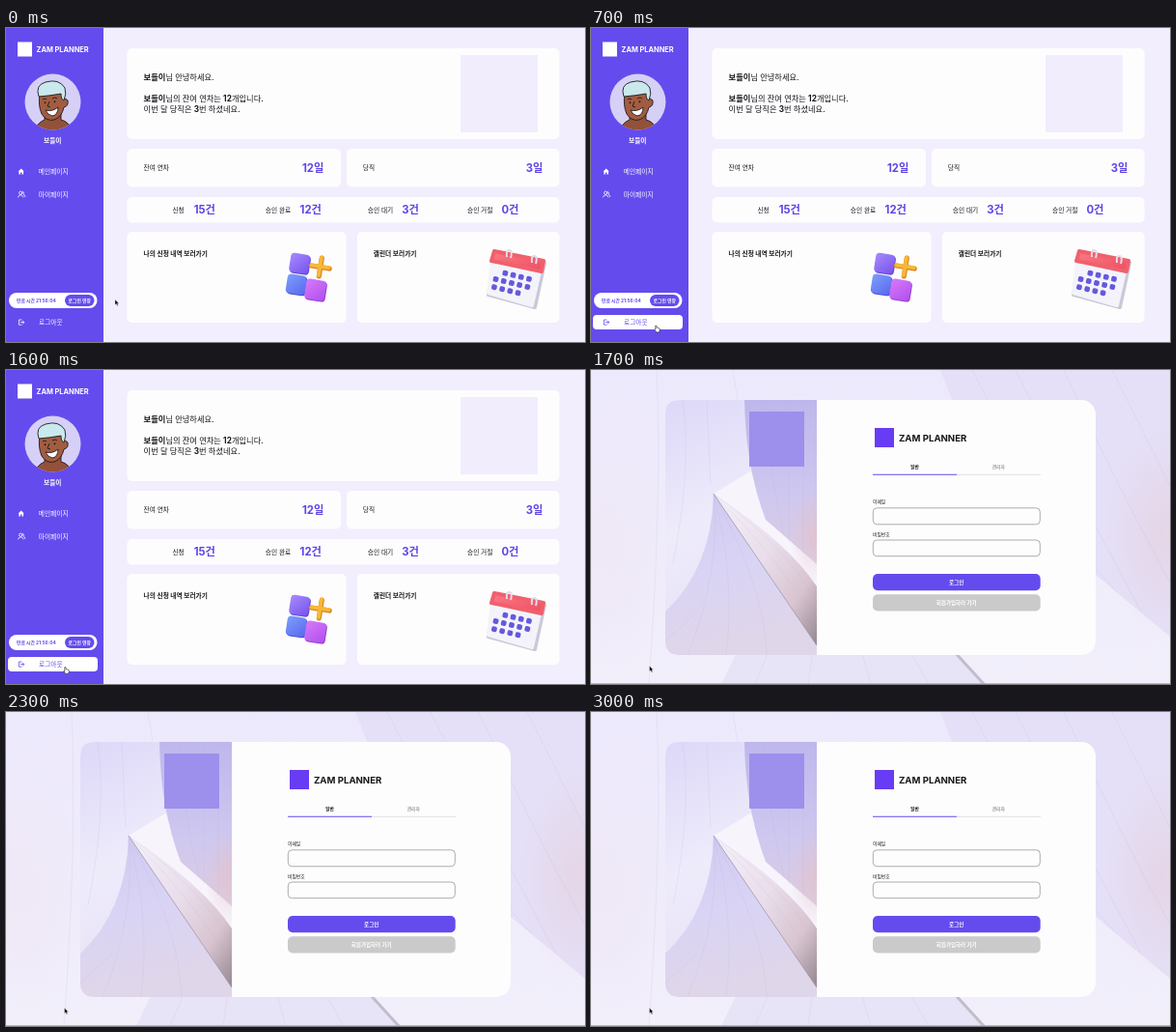
Write an HTML page that moves like this. It is 600 by 325 pixels and loops after 3.1 s.

```html
<!DOCTYPE html>
<html lang="ko">
<head>
<meta charset="utf-8">
<title>Planner sign-out</title>
<style>
  html, body { margin: 0; width: 100%; height: 100%; overflow: hidden; }
  svg { display: block; width: 600px; height: 325px; }
  text { font: 500 6.7px Inter, "Noto Sans CJK KR", sans-serif; fill: #17171b; }
  .bold, tspan { font-weight: 700; }
  .mid { text-anchor: middle; }
  .white { fill: #fff; }
  .brand { fill: #644bee; }
  .hello text { font-size: 8.25px; }
  .count text { font-size: 11.3px; font-weight: 700; fill: #5f45e6; text-anchor: end; }
  .tiny text { font-size: 4.8px; }
  .cards rect { fill: #fdfdfe; rx: 5px; }
  .icon { fill: none; stroke: #fff; stroke-width: .8; stroke-linejoin: round; stroke-linecap: round; }
  .field { fill: #fdfdfe; stroke: #98989e; stroke-width: .8; }
  .thin { fill: none; stroke: #b3aad8; stroke-width: .4; opacity: .45; }
</style>
</head>
<body>
<svg viewBox="0 0 600 325">
  <defs>
    <linearGradient id="violet" x2="1" y2="1"><stop stop-color="#a78bfb"/><stop offset="1" stop-color="#7654ee"/></linearGradient>
    <linearGradient id="blue" x2="1" y2="1"><stop stop-color="#7da0fc"/><stop offset="1" stop-color="#5a68ee"/></linearGradient>
    <linearGradient id="pink" x2="1" y2="1"><stop stop-color="#d77afa"/><stop offset="1" stop-color="#b14fee"/></linearGradient>
    <linearGradient id="red" x2="1" y2="1"><stop stop-color="#fb7c85"/><stop offset="1" stop-color="#ee4d60"/></linearGradient>
    <linearGradient id="haze" x2="0" y2="1"><stop stop-color="#ede9fc"/><stop offset="1" stop-color="#f2effb"/></linearGradient>
    <linearGradient id="wall" y2="1" x2=".3"><stop stop-color="#dcd8f8"/><stop offset=".5" stop-color="#eeebfb"/><stop offset="1" stop-color="#e6e1f6"/></linearGradient>
    <linearGradient id="shade" y2="1" x2="0"><stop stop-color="#beb7ec"/><stop offset=".6" stop-color="#cfc8ef"/><stop offset="1" stop-color="#dccde0"/></linearGradient>
    <linearGradient id="sail" y2="1" x2=".2"><stop stop-color="#cfc9f0"/><stop offset=".5" stop-color="#d9d4f5"/><stop offset="1" stop-color="#e0d6e9"/></linearGradient>
    <linearGradient id="fan" x2="1" y2="1"><stop stop-color="#f5f1fa"/><stop offset=".45" stop-color="#e9deeb"/><stop offset=".75" stop-color="#d8c4d0"/><stop offset="1" stop-color="#94868f"/></linearGradient>
    <radialGradient id="blush"><stop stop-color="#e5bfc6" stop-opacity=".6"/><stop offset="1" stop-color="#e5bfc6" stop-opacity="0"/></radialGradient>
    <clipPath id="panel"><path d="M234 31H92Q77 31 77 46V280Q77 295 92 295H234Z"/></clipPath>
    <clipPath id="portrait"><circle cx="48.5" cy="76.5" r="29"/></clipPath>
  </defs>

  <g id="dashboard">
    <rect width="600" height="325" fill="#f2eefd"/>
    <rect width="101" height="325" class="brand"/>
    <rect x="12" y="14.5" width="15" height="15" fill="#fff"/>
    <text x="31.5" y="24.6" class="bold white" style="font-size:7.4px">ZAM PLANNER</text>

    <circle cx="48.5" cy="76.5" r="29" fill="#d6d0f6"/>
    <g clip-path="url(#portrait)" stroke="#1d1a20" stroke-width=".9" stroke-linejoin="round">
      <path d="M29 108Q32 98 40 95V87H57V95Q66 97 69 108Z" fill="#93513a"/>
      <path d="M35 68Q33 80 37 89Q42 97 50 95Q58 92 60 82Q65 81 64 75Q62 72 59 74L58 65Z" fill="#a25c40"/>
      <path d="M34 71Q30 59 41 56Q55 52 61 62Q63 68 60 75Q57 74 57 68Q46 70 34 71Z" fill="#c9e9ec"/>
      <path d="M41 85Q48 87 54 82Q54 90 48 91Q43 90 41 85Z" fill="#fff"/>
      <path d="M38 74Q40 72 42 74M48 73Q51 71 53 73M45 76L43 81L46 82" fill="none"/>
      <path d="M40.5 77V77.6M50.5 76V76.6" stroke-width="1.6" stroke-linecap="round"/>
    </g>
    <text x="48.3" y="118.7" class="bold white mid">보들이</text>

    <path d="M12.6 148.5L15.7 145.4L18.8 148.5H18V151.5H16.5V149.4H14.9V151.5H13.4V148.5Z" fill="#fff"/>
    <g class="icon">
      <circle cx="15.2" cy="170.7" r="1.6"/>
      <path d="M12.6 175Q13 172.8 15.2 172.8T18 175M17.5 169.2Q19.2 170 18 172Q19.5 172.6 19.8 174.5"/>
    </g>
    <text x="33.8" y="151" class="white">메인페이지</text>
    <text x="33.8" y="175" class="white">마이페이지</text>

    <g class="tiny">
      <rect x="3" y="274" width="91.5" height="16" rx="8" fill="#fff"/>
      <text x="11" y="283.7" class="bold brand">만료 시간 21:56:04</text>
      <rect x="61" y="276" width="30.5" height="12" rx="6" class="brand"/>
      <text x="76.2" y="283.7" class="bold white mid">로그인 연장</text>
    </g>
    <rect id="row" x="2" y="297" width="93" height="15" rx="4" fill="#fff"/>
    <g id="logout">
      <path class="icon" style="stroke:currentColor" d="M16 302H13.4V307.2H16M15.3 304.6H18.8M17.4 303.2L18.8 304.6L17.4 306"/>
      <text x="34" y="307" style="fill:currentColor">로그아웃</text>
    </g>

    <g class="cards">
      <rect x="125.5" y="21" width="448" height="94"/>
      <rect x="125.5" y="125" width="221.5" height="39.5"/>
      <rect x="353" y="125" width="220.5" height="39.5"/>
      <rect x="125.5" y="175" width="448" height="26.5"/>
      <rect x="125.5" y="211" width="227" height="94"/>
      <rect x="364" y="211" width="209.5" height="94"/>
    </g>
    <rect x="471" y="28" width="80" height="80" fill="#f1edfd"/>
    <g class="hello">
      <text x="142.6" y="54.3"><tspan>보들이</tspan>님 안녕하세요.</text>
      <text x="142.6" y="76.2"><tspan>보들이</tspan>님의 잔여 연차는 <tspan>12</tspan>개입니다.</text>
      <text x="142.6" y="87">이번 달 당직은 <tspan>3</tspan>번 하셨네요.</text>
    </g>
    <text x="142.6" y="147.3">잔여 연차</text>
    <text x="369.8" y="147.3">당직</text>
    <text x="172.4" y="190.6">신청</text>
    <text x="268.8" y="190.6">승인 완료</text>
    <text x="374.8" y="190.6">승인 대기</text>
    <text x="478" y="190.6">승인 거절</text>
    <g class="count">
      <text x="329.3" y="149">12일</text>
      <text x="556.5" y="149">3일</text>
      <text x="217" y="192.3">15건</text>
      <text x="327" y="192.3">12건</text>
      <text x="428" y="192.3">3건</text>
      <text x="531.5" y="192.3">0건</text>
    </g>
    <text x="142.6" y="235.6" class="bold">나의 신청 내역 보러가기</text>
    <text x="380.8" y="235.6" class="bold">캘린더 보러가기</text>

    <g transform="rotate(9 312 258)">
      <rect x="293" y="236" width="20" height="20" rx="4" fill="#6544d2"/>
      <rect x="292" y="235" width="20" height="20" rx="4" fill="url(#violet)"/>
      <rect x="293" y="258" width="20" height="20" rx="4" fill="#4653ce"/>
      <rect x="292" y="257" width="20" height="20" rx="4" fill="url(#blue)"/>
      <rect x="313" y="260" width="21" height="21" rx="4" fill="#963fd0"/>
      <rect x="312" y="259" width="21" height="21" rx="4" fill="url(#pink)"/>
      <path d="M324 236V255M314.5 245.5H333.5" stroke="#d98a1c" stroke-width="5.2" stroke-linecap="round"/>
      <path d="M323.5 235.6V254M314.5 244.8H332.6" stroke="#f9b739" stroke-width="3.8" stroke-linecap="round"/>
    </g>

    <g stroke-linejoin="round">
      <path d="M507 232L558 243L548 289L500 276Z" fill="#c9c9d8" stroke="#c9c9d8" stroke-width="4"/>
      <path d="M505 232L555 243L545 287L500 274Z" fill="#f4f3fb" stroke="#f4f3fb" stroke-width="4"/>
      <path d="M506 231L557 241L555 252L503 241Z" fill="url(#red)" stroke="#f0606d" stroke-width="4"/>
      <path d="M519 237Q518 229 522 230Q525 231 523 238M545 243Q544 235 548 236Q551 237 549 244" fill="none" stroke="#e3dcea" stroke-width="2"/>
      <g id="days" fill="#6559dc"/>
    </g>
  </g>

  <g id="login">
    <rect width="600" height="325" fill="url(#haze)"/>
    <path d="M362 0H600V276L523 212L400 100Q380 45 362 0Z" fill="#e5e0f7"/>
    <path d="M135 325L152 290H377L409 325Z" fill="#e8e4f7"/>
    <path d="M377 290L409 325H405L373 290Z" fill="#c3bccb"/>
    <ellipse cx="15" cy="190" rx="70" ry="130" fill="url(#blush)" opacity=".2"/>
    <ellipse cx="592" cy="170" rx="60" ry="110" fill="url(#blush)" opacity=".55"/>
    <path class="thin" d="M395 0Q470 150 545 230M440 0Q500 120 570 250M490 0Q540 110 600 220M540 0Q570 60 600 120M147 0L152 31M68 0Q74 130 60 325M185 290L170 325M230 290L225 325M280 290L290 325M330 290L350 325"/>
    <rect x="77" y="31" width="446" height="264" rx="15" fill="#fdfdfe"/>

    <g clip-path="url(#panel)">
      <rect x="77" y="31" width="157" height="264" fill="url(#wall)"/>
      <path d="M127 128L165 105L234 195V230Z" fill="#f7f4fc"/>
      <path d="M159 31H234V201L181 155Q160 100 159 31Z" fill="url(#shade)"/>
      <ellipse cx="232" cy="170" rx="26" ry="50" fill="url(#blush)"/>
      <path d="M127 128Q205 180 234 224V286Z" fill="url(#fan)"/>
      <path d="M127 128L234 286V295H77V250Q125 205 127 128Z" fill="url(#sail)"/>
      <path d="M127 128L234 285" stroke="#a89db6" stroke-width=".9"/>
      <path class="thin" d="M127 128Q135 210 100 295M127 128Q150 215 140 295M127 128Q180 225 182 295M127 128Q195 195 234 262M127 128Q200 180 234 240M77 280Q95 265 110 250M95 31Q105 100 85 200M120 31L124 120M180 31Q184 110 200 170M205 31V178M220 31V190"/>
      <rect x="164" y="43" width="57" height="57" fill="#9d90ec"/>
    </g>

    <rect x="294" y="60" width="20" height="20" fill="#683cf3"/>
    <text x="319" y="74" class="bold" style="font-size:9.6px">ZAM PLANNER</text>
    <g class="tiny">
      <text x="335.5" y="102.3" class="bold mid">일반</text>
      <text x="422.3" y="102.3" class="mid" style="fill:#66666c">관리자</text>
      <text x="292" y="138.4">이메일</text>
      <text x="292" y="171.5">비밀번호</text>
    </g>
    <path d="M379 108.3H466" stroke="#d5d5da" stroke-width=".7"/>
    <path d="M292 108.2H379" stroke="#644bee" stroke-width="1.1"/>
    <rect class="field" x="292.3" y="142.8" width="173" height="17" rx="4"/>
    <rect class="field" x="292.3" y="176" width="173" height="16.7" rx="4"/>
    <rect class="brand" x="292" y="211" width="173.7" height="17.3" rx="5"/>
    <rect x="292" y="232.2" width="173.7" height="17.3" rx="5" fill="#cacaca"/>
    <text x="378.7" y="221.6" class="bold white mid" style="font-size:5.5px">로그인</text>
    <text x="378.7" y="242.7" class="bold white mid" style="font-size:5.5px">회원가입하러 가기</text>
    <path d="M0 324.6H600" stroke="#a9a7b2" stroke-width=".8"/>
  </g>

  <g id="pointer">
    <path id="arrow" d="M0 0V5.6L1.3 4.5L2.2 6.6L3.2 6.2L2.3 4.2H4Z" fill="#000" stroke="#fff" stroke-width=".35"/>
    <path id="hand" d="M1.3 .6Q2.2 0 2.5 1.2V2.7Q3.3 2.3 3.7 3Q4.4 2.6 4.8 3.3Q5.7 3 5.8 4V5.4L5 7.4H2.3L.3 4.8Q.2 4 1.4 4.5Z" fill="#fff" stroke="#222" stroke-width=".65"/>
  </g>
</svg>
<script>
  const LOOP = 3100, STEP = 100, SIGNED_OUT = 1700;
  const path = [[0, 113, 281], [400, 67.5, 310], [700, 65.5, 307.5], [1200, 59.5, 307], [LOOP, 59.5, 307]];
  const el = id => document.getElementById(id);
  const clamp = v => Math.min(1, Math.max(0, v));
  const mix = (a, b, k) => a + (b - a) * k;
  const show = (id, on) => el(id).setAttribute('display', on ? 'inline' : 'none');

  // Calendar days; the first and last rows are shorter.
  for (let row = 0; row < 3; row++) {
    for (let col = row ? 0 : 1; col < (row < 2 ? 5 : 4); col++) {
      const x = 507 + col * 8.2 - row * 1.6, y = 248.5 + col * 2 + row * 8.2;
      el('days').innerHTML += `<rect x="${x}" y="${y}" width="5.6" height="5.6" rx="1.8" transform="rotate(12 ${x} ${y})"/>`;
    }
  }

  function pointerAt(t) {
    const i = path.findIndex(p => p[0] > t);
    const [t0, x0, y0] = path[i - 1], [t1, x1, y1] = path[i];
    const k = (t - t0) / (t1 - t0), eased = k * k * (3 - 2 * k);
    return [mix(x0, x1, eased), mix(y0, y1, eased)];
  }

  function draw(t) {
    const out = t >= SIGNED_OUT;
    const [x, y] = out ? [60.6, 306.3] : pointerAt(t);
    const hover = clamp((t - 220) / 260);
    const link = !out && hover > 0;
    show('dashboard', !out);
    show('login', out);
    show('hand', link);
    show('arrow', !link);
    el('pointer').setAttribute('transform', `translate(${x} ${y})`);
    el('row').setAttribute('opacity', hover);
    el('logout').style.color = `rgb(${[100, 75, 238].map(c => Math.round(mix(255, c, hover)))})`;
  }

  function tick() {
    draw(Math.floor(performance.now() % LOOP / STEP) * STEP);
    requestAnimationFrame(tick);
  }
  tick();
</script>
</body>
</html>
```
